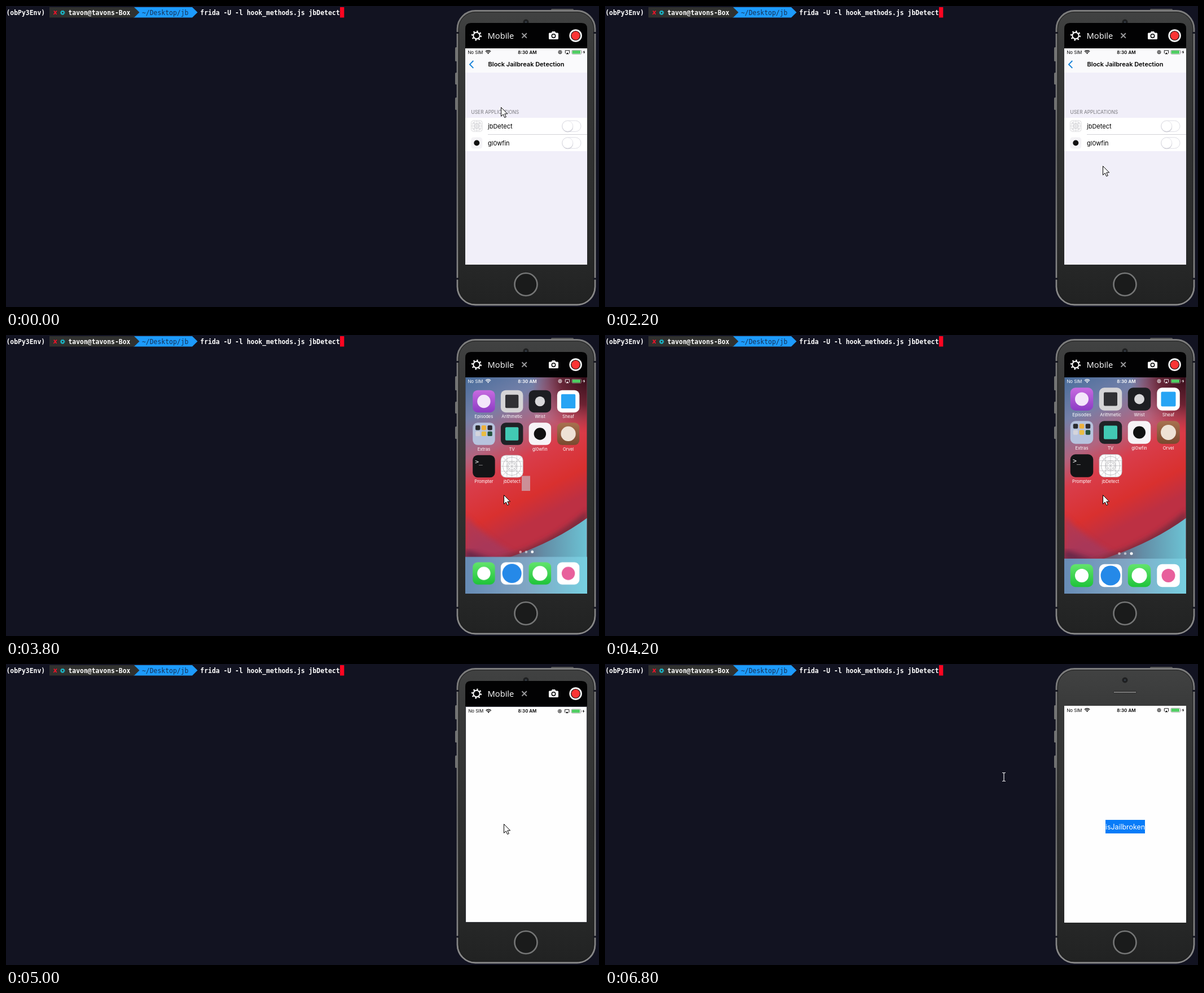
These frames come from a looping animation (1051 px wide and 533 px high, 8 s). An HTML page:

```html
<!DOCTYPE html>
<html lang="en">
<head>
<meta charset="utf-8">
<title>Shell and mobile demo</title>
<style>
html, body { margin: 0; width: 100%; height: 100%; overflow: hidden; background: #121321; }
svg { display: block; }
text { white-space: pre; }
.mono { font: bold 11.41px "DejaVu Sans Mono", monospace; fill: #fff; }
.ui { font-family: Inter, sans-serif; fill: #000; }
.app-name { font-size: 7.8px; fill: #fff; text-anchor: middle; }
.anim { animation: 8s step-end infinite; }

#arrow { animation-name: arrow; }
#beam { animation-name: beam; }
#bar { animation-name: bar; }
#list { animation-name: list; transform-origin: 922px 266px; }
#hairline { animation-name: hairline; }
#home { animation-name: home; }
#icons { animation-name: icons; }
#shrunk { animation-name: shrunk; }
#pressed { animation-name: pressed; }
#app { animation-name: app; transform-origin: 922px 266px; }
#button { animation-name: button; }

@keyframes arrow {
  0% { transform: translate(877px, 179px); }
  2.5% { transform: translate(877px, 183px); }
  5% { transform: translate(878px, 202px); }
  7.5% { transform: translate(880px, 233px); }
  10% { transform: translate(881px, 262px); }
  12.5% { transform: translate(882px, 278px); }
  15% { transform: translate(882px, 283px); }
  77.5% { transform: translate(873px, 278px); }
  80% { transform: translate(836px, 256px); }
  82.5%, 100% { transform: translate(836px, 256px); visibility: hidden; }
}
@keyframes beam {
  0% { transform: translate(760px, 218px); visibility: hidden; }
  82.5% { transform: translate(760px, 218px); visibility: visible; }
  85%, 100% { transform: translate(707px, 200px); visibility: visible; }
}
@keyframes bar { 0% { opacity: 1; } 82.5% { opacity: .5; } 85%, 100% { opacity: 0; } }
@keyframes list {
  0% { transform: none; }
  45% { transform: scale(.995); }
  47.5%, 100% { visibility: hidden; }
}
@keyframes hairline { 0% { opacity: 0; } 45%, 100% { opacity: 1; } }
@keyframes home {
  0% { visibility: hidden; }
  47.5% { visibility: visible; }
  62.5%, 100% { visibility: hidden; }
}
@keyframes icons {
  0%, 47.5% { transform: scale(.975); transform-origin: 922px 271px; }
  50% { transform: scale(.995); transform-origin: 922px 271px; }
  52.5% { transform: none; }
  60%, 100% { transform: scale(1.6); transform-origin: 896px 231px; }
}
@keyframes shrunk { 0%, 47.5% { opacity: 1; } 50%, 100% { opacity: 0; } }
@keyframes pressed { 0% { opacity: 0; } 57.5%, 100% { opacity: .4; } }
@keyframes app {
  0% { visibility: hidden; }
  60% { visibility: visible; transform: translate(-8px, -10px) scale(.7); }
  62.5% { visibility: visible; transform: scale(.99); }
  65%, 100% { visibility: visible; transform: none; }
}
@keyframes button { 0% { opacity: 0; } 67.5%, 100% { opacity: 1; } }
</style>
</head>
<body>
<svg width="1051" height="533" viewBox="0 0 1051 533">
<defs>
  <linearGradient id="body" x2="0" y2="1">
    <stop stop-color="#414242"/><stop offset=".15" stop-color="#383939"/>
    <stop offset=".8" stop-color="#292a2a"/><stop offset="1" stop-color="#212222"/>
  </linearGradient>
  <linearGradient id="rim" x2="0" y2="1">
    <stop stop-color="#7d7d7d"/><stop offset=".5" stop-color="#696a6a"/><stop offset="1" stop-color="#8a8a8a"/>
  </linearGradient>
  <linearGradient id="sky" gradientUnits="userSpaceOnUse" x1="815" y1="75" x2="945" y2="325">
    <stop stop-color="#496d9c"/><stop offset=".24" stop-color="#7480a8"/>
    <stop offset=".46" stop-color="#b2647f"/><stop offset=".62" stop-color="#d93d4b"/>
    <stop offset=".85" stop-color="#d9302f"/><stop offset="1" stop-color="#bd3043"/>
  </linearGradient>
  <radialGradient id="corner" gradientUnits="userSpaceOnUse" cx="1032" cy="74" r="100">
    <stop stop-color="#330c18"/><stop offset=".5" stop-color="#5f1826" stop-opacity=".85"/>
    <stop offset="1" stop-color="#b02838" stop-opacity="0"/>
  </radialGradient>
  <linearGradient id="sea" gradientUnits="userSpaceOnUse" x1="890" y1="385" x2="1030" y2="385">
    <stop stop-color="#70556f"/><stop offset=".45" stop-color="#638da6"/><stop offset="1" stop-color="#6cc3d4"/>
  </linearGradient>
  <linearGradient id="dock">
    <stop stop-color="#6589b4"/><stop offset=".5" stop-color="#80a6c4"/><stop offset="1" stop-color="#76d5e4"/>
  </linearGradient>
  <linearGradient id="purple" x2="0" y2="1"><stop stop-color="#c86be0"/><stop offset="1" stop-color="#8b3cc4"/></linearGradient>
  <linearGradient id="green" x2="0" y2="1"><stop stop-color="#62e46c"/><stop offset="1" stop-color="#1fc43a"/></linearGradient>
  <linearGradient id="brown" x2="0" y2="1"><stop stop-color="#a8714f"/><stop offset="1" stop-color="#79492f"/></linearGradient>
  <clipPath id="screen"><path d="M814.5 74.5h215v383h-215z"/></clipPath>
  <filter id="soft"><feGaussianBlur stdDeviation="5"/></filter>

  <g id="status">
    <g fill="currentColor" font-family="Inter, sans-serif">
      <text x="818.5" y="84.6" font-size="7.8">No SIM</text>
      <text x="924" y="84.6" font-size="8" font-weight="600" text-anchor="middle">8:30 AM</text>
      <path d="M853 83.3l1.5 2 1.5-2a2 2 0 0 0-3 0z"/>
      <path d="M1025.3 78.5l-2.6 3.6h1.6l-.5 2.8 2.5-3.7h-1.6z"/>
      <path d="M992.3 85.3h5.4l-2.7-3z"/>
      <path d="M1020.7 80.3q1.2 1.4 0 2.8z"/>
    </g>
    <g fill="none" stroke="currentColor">
      <path d="M849.9 80.6a6.3 6.3 0 0 1 9.2 0M851.4 82.3a4.2 4.2 0 0 1 6.2 0" stroke-width="1.3"/>
      <circle cx="982" cy="81.7" r="3" stroke-width=".9"/>
      <path d="M980.8 83v-1.7h2.4V83zM981.3 81v-.8h1.4v.8" stroke-width=".7"/>
      <path d="M992 83.6h-.7v-4.8h7.4v4.8h-.7" stroke-width=".9"/>
      <rect x="1002.9" y="78.2" width="17" height="7" rx="1.8" stroke-width=".6" opacity=".6"/>
    </g>
    <rect x="1003.7" y="79" width="14.3" height="5.4" rx="1" fill="#4fce62"/>
  </g>

  <g id="grid" fill="none" stroke="#9c9ca2" stroke-width=".6">
    <rect x="-20" y="-20" width="40" height="40" rx="9" fill="#fdfdfd"/>
    <circle r="16.5"/><circle r="9"/><circle r="6.5"/>
    <path d="M-19 0h38M0-19v38M-17-17l34 34M17-17l-34 34M-19-9h38M-19 9h38M-9-19v38M9-19v38" opacity=".75"/>
  </g>
  <g id="toggle">
    <rect x="985.5" y="-9.7" width="33.5" height="19.4" rx="9.7" fill="#fff" stroke="#dedee5"/>
    <circle cx="995.6" cy="1.2" r="9.6" fill="#cfcfd7"/>
    <circle cx="995.4" cy="0" r="9.4" fill="#fff" stroke="#d9d9e0" stroke-width=".6"/>
  </g>
</defs>

<rect width="1051" height="533" fill="#121321"/>

<g class="mono">
  <path d="M226 2h104l9.5 9.2-9.5 9.2H226z" fill="#1d9bfd"/>
  <path d="M77 2h150l9.5 9.2-9.5 9.2H77z" fill="#30312f"/>
  <text x="0.5" y="15.5">(obPy3Env)</text>
  <path d="M85 8.5l4.6 6.5M90 8.5l-5.6 6.5" stroke="#f3122a" stroke-width="1.8"/>
  <circle cx="100.3" cy="11.8" r="2.5" fill="none" stroke="#19c5d8" stroke-width="1.7"/>
  <circle cx="100.3" cy="11.8" r="3.9" fill="none" stroke="#19c5d8" stroke-width="1" stroke-dasharray="1.5 1.56"/>
  <text x="110.5" y="15.5">tavon@tavons-Box</text>
  <text x="241" y="15.5" style="fill:#17304f;font-weight:400">~/Desktop/jb</text>
  <text x="344.3" y="15.5">frida -U -l hook_methods.js jbDetect</text>
  <rect x="592" y="2" width="7.3" height="18.5" fill="#fb0521"/>
</g>

<g id="handset">
  <g fill="#717272">
    <rect x="966" y="5" width="40" height="5" rx="1.5" fill="#555"/>
    <rect x="796" y="73" width="5" height="25" rx="1.5"/>
    <rect x="796" y="118" width="5" height="21" rx="1.5"/>
    <rect x="796" y="162" width="5" height="22" rx="1.5"/>
  </g>
  <rect x="800" y="8.5" width="244" height="520.5" rx="32" fill="url(#body)" stroke="url(#rim)" stroke-width="2.8"/>
  <rect x="802.2" y="10.7" width="239.6" height="516" rx="30" fill="none" stroke="#1d1e1e" stroke-width=".9"/>
  <path d="M798 47.5h5M1041 47.5h5M798 483h5M1041 483h5" stroke="#161720" stroke-width="3"/>
  <circle cx="921.5" cy="28.5" r="4.6" fill="#1e1f20" stroke="#202122"/>
  <circle cx="921.5" cy="28.5" r="1.8" fill="#343c46"/>
  <rect x="901" y="48.3" width="41" height="3.4" rx="1.7" fill="#777" stroke="#232424"/>
  <circle cx="921.5" cy="493" r="20" fill="#1a1b1b" stroke="#757676" stroke-width="2.6"/>
</g>

<g clip-path="url(#screen)">
  <rect x="814" y="74" width="216" height="384" fill="#292b38"/>

  <g id="home" class="anim">
    <rect x="814" y="74" width="216" height="384" fill="url(#sky)"/>
    <rect x="814" y="74" width="216" height="384" fill="url(#corner)"/>
    <path d="M814 320q60 60 110 75l-110 8z" fill="#9c3c68" opacity=".6" filter="url(#soft)"/>
    <path d="M850 398q95-14 180-88v90z" fill="#7e2b3d" filter="url(#soft)"/>
    <path d="M872 400q92-28 158-76v80z" fill="url(#sea)"/>
    <path d="M814 380l60 20h-60z" fill="#4b2342" opacity=".7" filter="url(#soft)"/>
    <g id="icons" class="anim ui">
      <rect x="800" y="396" width="244" height="74" fill="url(#dock)"/>
      <g fill="#fff">
        <circle cx="911.5" cy="387" r="2.3" opacity=".55"/>
        <circle cx="922" cy="387" r="2.3" opacity=".55"/>
        <circle cx="933" cy="387" r="2.5"/>
      </g>
    </g>
    <rect id="shrunk" class="anim" x="914" y="249.5" width="15" height="26.5" fill="#c9a7af" fill-opacity=".8"/>
    <use href="#status" color="#fff"/>
  </g>

  <g id="list" class="anim ui">
    <rect x="814" y="74" width="216" height="384" fill="#f1eff9"/>
    <rect x="814" y="74" width="216" height="44" fill="#fafafc"/>
    <path id="hairline" class="anim" d="M814 118.5h216" stroke="#b9b9bd"/>
    <use href="#status" color="#000"/>
    <path d="M828.3 97l-6.3 6.4 6.3 6.4" fill="none" stroke="#1380d8" stroke-width="1.9"/>
    <text x="922" y="107.3" font-size="11" font-weight="600" text-anchor="middle">Block Jailbreak Detection</text>
    <text x="824.5" y="191.3" font-size="8.4" style="fill:#77777c">USER APPLICATIONS</text>
    <rect x="814" y="198" width="216" height="59" fill="#fff"/>
    <path d="M854 227.5h176" stroke="#d2d2d7"/>
    <use href="#grid" transform="translate(834.3 212.5) scale(.5)"/>
    <rect x="824.3" y="232.5" width="20" height="20" rx="4.5" fill="#f4f3f6"/>
    <circle cx="834.3" cy="242.5" r="5" fill="#111"/>
    <text x="854" y="217" font-size="11">jbDetect</text>
    <text x="854" y="246.7" font-size="11">gl0wfin</text>
    <use href="#toggle" y="212.7"/>
    <use href="#toggle" y="242.5"/>
  </g>

  <g id="app" class="anim ui">
    <rect x="814" y="74" width="216" height="384" fill="#fefefe"/>
    <use href="#status" color="#000"/>
    <g id="button" class="anim">
      <rect x="887" y="276" width="70" height="24" fill="#087cf8"/>
      <text x="922" y="293" font-size="12.4" text-anchor="middle" style="fill:#fff">isJailbroken</text>
    </g>
  </g>
</g>

<g id="bar" class="anim">
  <path d="M814 75V40q0-10 10-10h196q10 0 10 10v35z" fill="#020203"/>
  <g fill="none" stroke="#fff">
    <circle cx="834" cy="52.5" r="5.7" stroke-width="2"/>
    <circle cx="834" cy="52.5" r="7.8" stroke-width="2.6" stroke-dasharray="2.4 3.726"/>
    <path d="M914.5 48.2l8.4 8.4M922.9 48.2l-8.4 8.4" stroke="#9b9b9d" stroke-width="2"/>
  </g>
  <text x="853.5" y="58" style="font:14.7px 'Open Sans', sans-serif;fill:#fff">Mobile</text>
  <path d="M963.5 47.5h3l1.5-2.5h5l1.5 2.5h3q1.5 0 1.5 1.5v8.5q0 1.5-1.5 1.5h-14q-1.5 0-1.5-1.5V49q0-1.5 1.5-1.5z" fill="#fff"/>
  <circle cx="970.5" cy="53" r="3.2" fill="#fff" stroke="#020203" stroke-width="1.5"/>
  <circle cx="1009.6" cy="52.5" r="11.2" fill="#fff"/>
  <circle cx="1009.6" cy="52.5" r="8" fill="#fb3535" stroke="#151515" stroke-width="1.2"/>
</g>

<path id="arrow" class="anim" d="M.5.5v15.8l3.7-3.5 2.5 5.7 2.6-1.1-2.5-5.5h4.9z" fill="#fff" stroke="#000"/>
<path id="beam" class="anim" d="M-3-7.5h2L0-6.5l1-1h2M0-6.5v13M-3 7.5h2l1-1 1 1h2" fill="none" stroke="#e8e8ea" stroke-width="1.2"/>
</svg>

<script>
const NS = 'http://www.w3.org/2000/svg';
const icons = document.getElementById('icons');
const cols = [845, 896, 947, 998.5];
const rows = [113.5, 172.5, 231.5, 426];

function add(parent, tag, attrs, text) {
  const el = document.createElementNS(NS, tag);
  for (const key in attrs) el.setAttribute(key, attrs[key]);
  if (text) el.textContent = text;
  return parent.appendChild(el);
}
const square = (parent, x, y, size, rx, fill) =>
  add(parent, 'rect', { x: x - size / 2, y: y - size / 2, width: size, height: size, rx, fill });

// name, tile colour, mark shape, mark colour, mark size
const apps = [
  ['Episodes', 'url(#purple)', 'disc', '#f3e6fa', 24],
  ['Arithmetic', '#d5d4d6', 'box', '#303034', 24],
  ['Wrist', '#1d1e22', 'disc', '#d8d8da', 18],
  ['Sheaf', '#fff', 'box', '#27a4f4', 26],
  ['Extras', '#b7c3de', 'folder'],
  ['TV', '#202226', 'box', '#42c9b4', 24],
  ['gl0wfin', '#f7f3f6', 'disc', '#111', 22],
  ['Orvel', 'url(#brown)', 'disc', '#eee2d5', 27],
  ['Prompter', '#131416', 'prompt'],
  ['jbDetect', '#fdfdfd', 'grid']
];
const dock = [
  ['', 'url(#green)', 'disc', '#fff', 24],
  ['', '#fff', 'disc', '#2589e8', 35],
  ['', 'url(#green)', 'disc', '#fff', 27],
  ['', '#fff', 'disc', '#e8609c', 24]
];

const marks = {
  disc: (g, fill, size) => add(g, 'circle', { r: size / 2, fill }),
  box: (g, fill, size) => square(g, 0, 0, size, 2, fill),
  folder: g => ['#292b2e', '#edb03c', '#2c2930', '#d4d4dc', '#eabd42', '#24523d']
    .forEach((fill, i) => square(g, (i % 3 - 1) * 11, i < 3 ? -11 : 0, 8.5, 2, fill)),
  prompt: g => add(g, 'text', { x: -16, y: -5, style: 'font:11.5px "DejaVu Sans Mono",monospace;fill:#fff' }, '>_'),
  grid: g => {
    add(g, 'use', { href: '#grid' });
    const shade = square(g, 0, 0, 40.5, 9, '#000');
    shade.id = 'pressed';
    shade.setAttribute('class', 'anim');
  }
};

function place([name, tile, mark, fill, size], col, row) {
  const g = add(icons, 'g', { transform: `translate(${cols[col]} ${rows[row]})` });
  square(g, 0, 0, 40.5, 9, tile);
  marks[mark](g, fill, size);
  if (name) add(g, 'text', { class: 'app-name', y: 30.6 }, name);
}
apps.forEach((app, i) => place(app, i % 4, i >> 2));
dock.forEach((app, i) => place(app, i, 3));
</script>
</body>
</html>
```
